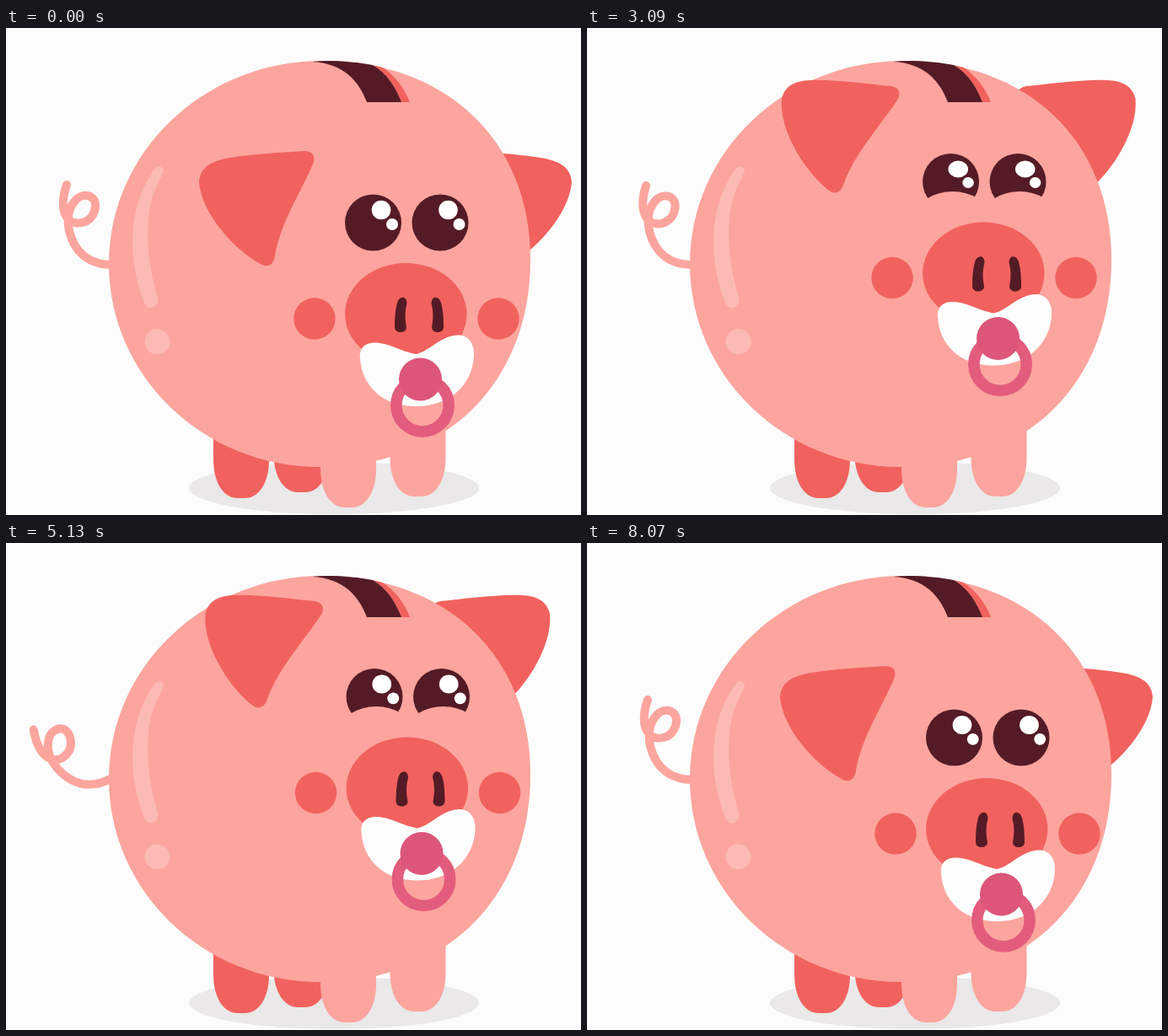
Animation, 682 px wide and 578 px high, one loop 8100 ms. Source, as an HTML page with a canvas:

```html
<!DOCTYPE html>
<html lang="en">
<head>
<meta charset="utf-8">
<title>Piggy bank</title>
<style>
html, body { margin: 0; width: 100%; height: 100%; overflow: hidden; background: #fcfcfc; }
canvas { display: block; width: 682px; height: 578px; }
</style>
</head>
<body>
<canvas id="stage" width="682" height="578"></canvas>
<script>
const ctx = document.getElementById('stage').getContext('2d');
const LOOP = 8100, TAU = Math.PI * 2;
const BG = '#fcfcfc', SKIN = '#fca59e', RED = '#f1625e', DARK = '#541b26',
  SHINE = '#fcbab5', SHADE = '#eae8e8', PINK = '#e25c7e', ROSE = '#dc5679';

const shape = {
  body: 'M122 280C122 147 235 39 375 39C523 39 622 134 622 275C622 421 521 521 372 521C234 521 122 413 122 280Z',
  tail: 'M72 186C66 203 66 219 74 227C83 236 104 232 106 212C107 197 90 195 82 205C74 214 72 226 75 241C81 265 97 281 126 281',
  ear: 'M229 183C230 163 248 157 266 154C297 149 325 148 354 146C363 146 367 151 365 159C350 195 326 230 319 270C317 283 309 285 300 279C270 262 232 220 229 183Z',
  slot: 'M363 40Q372 39 380 39C400 39 420 41 435 44C452 54 462 70 469 88H428C418 62 400 42 363 40Z',
  slotEdge: 'M435 44L447 47C462 57 473 72 479 88H469C462 70 452 54 435 44Z',
  shine: 'M175 169C178 163 186 163 187 169C186 176 172 193 169 225C166 258 171 290 180 320C182 331 169 338 164 326C144 275 144 213 175 169Z',
  nostril: 'M475.5 327C475.5 318 467 317 464 326C461.5 335 461 346 461 355C461 363 475 363 475 355C473 345 473 336 475.5 327Z',
  shield: 'M420 392C418 374 434 371 449 375C463 379 474 385 486 387C500 385 513 368 531 365C546 362 556 372 555 389C553 425 525 449 486 449C446 449 422 424 420 392Z'
};
for (const k in shape) shape[k] = new Path2D(shape[k]);

const clamp = v => Math.min(1, Math.max(0, v));
const ease = (t, a, b) => { const p = clamp((t - a) / (b - a)); return p * p * (3 - 2 * p); };

function fill(path, color) {
  ctx.fillStyle = color;
  ctx.fill(path);
}

function oval(x, y, rx, ry, color) {
  ctx.fillStyle = color;
  ctx.beginPath();
  ctx.ellipse(x, y, rx, ry, 0, 0, TAU);
  ctx.fill();
}

function group(draw) {
  ctx.save();
  draw();
  ctx.restore();
}

function leg(x, bottom, color) {
  const r = x + 66, m = x + 33;
  ctx.fillStyle = color;
  ctx.beginPath();
  ctx.moveTo(x, 465);
  ctx.lineTo(x, bottom - 46);
  ctx.bezierCurveTo(x, bottom - 18, x + 12, bottom, m - 4, bottom);
  ctx.lineTo(m + 4, bottom);
  ctx.bezierCurveTo(r - 12, bottom, r, bottom - 18, r, bottom - 46);
  ctx.lineTo(r, 465);
  ctx.fill();
}

// Head shake phase in turns, linear between [time, turns]
const turns = [[1264, -2.25], [2250, -0.05], [4440, 4.95], [5820, 8.5], [6690, 11], [7018, 11.75]];

function shake(t) {
  if (t <= turns[0][0] || t >= turns[turns.length - 1][0]) return 0;
  const i = turns.findIndex(k => k[0] > t);
  const [t0, p0] = turns[i - 1], [t1, p1] = turns[i];
  return -6.6 * Math.cos(TAU * (p0 + (p1 - p0) * (t - t0) / (t1 - t0)));
}

function tailAngle(t) {
  const start = 932, wag = 437;
  if (t < start || t > start + 15 * wag) return 0;
  return -32 * (1 - Math.cos(TAU * (t - start) / wag)) / 2;
}

function drawTail(t) {
  group(() => {
    ctx.translate(122, 281);
    ctx.rotate(tailAngle(t) * Math.PI / 180);
    ctx.translate(-122, -281);
    ctx.strokeStyle = SKIN;
    ctx.lineWidth = 10;
    ctx.lineCap = 'round';
    ctx.stroke(shape.tail);
  });
}

function drawEar(lift, dx, far) {
  group(() => {
    if (far) {
      ctx.translate(900 - 18.5 * lift, 0);
      ctx.scale(-1, 1);
    }
    ctx.translate(295 + 2.5 * lift + dx, 200 - 88 * lift);
    ctx.rotate(lift * Math.PI / 18);
    ctx.translate(-295, -200);
    fill(shape.ear, RED);
  });
}

function drawEye(x, y, lift, w) {
  oval(x, y, 33.5, 33.5, DARK);
  oval(x + 9.5 - 0.8 * lift, y - 15, 11.3 + 0.7 * w, 11.3 - 1.9 * w, '#fff');
  oval(x + 22.5 - 3 * w, y + 2 - 1.5 * w, 7 - 0.4 * w, 7 - 0.8 * w, '#fff');
  if (lift > 0) oval(x + 2, y + 64 - 24.5 * lift, 42, 28, SKIN);
}

function drawFace(dx, dy, lift, w) {
  group(() => {
    ctx.translate(dx, dy);
    drawEye(435.5, 231, lift, w);
    drawEye(515, 231, lift, w);
    oval(366, 345, 24.7, 24.7, RED);
    oval(584, 345, 24.7, 24.7, RED);
    oval(474.3, 339.5, 72.2, 60.5, RED);
    fill(shape.nostril, DARK);
    group(() => {
      ctx.translate(980, 0);
      ctx.scale(-1, 1);
      fill(shape.nostril, DARK);
    });
    fill(shape.shield, '#fdfdfd');
    ctx.strokeStyle = PINK;
    ctx.lineWidth = 13.5;
    ctx.beginPath();
    ctx.arc(494, 447.7, 31.2, 0, TAU);
    ctx.stroke();
    oval(491.5, 417, 25.5, 25.5, ROSE);
  });
}

function draw(t) {
  const lift = ease(t, 1010, 1340) * (1 - ease(t, 7018, 7420));
  const dip = 3 * ease(t, 900, 1010) * (1 - ease(t, 1010, 1200));
  const dx = shake(t);
  const twinkle = (1 - Math.cos(TAU * t / 300)) / 2;

  ctx.fillStyle = BG;
  ctx.fillRect(0, 0, 682, 578);
  oval(389, 546, 172, 31, SHADE);
  drawTail(t);
  drawEar(lift, dx, true);
  leg(246, 558, RED);
  leg(317.5, 551, RED);
  leg(373, 569, SKIN);
  leg(455.5, 556, SKIN);
  fill(shape.body, SKIN);
  fill(shape.slotEdge, RED);
  fill(shape.slot, DARK);
  fill(shape.shine, SHINE);
  oval(179.5, 372.5, 15, 15, SHINE);
  drawEar(lift, dx, false);
  drawFace(dx + 0.5 * lift, dip - 48.5 * lift, lift, twinkle);
}

let origin = null;
function tick(now) {
  if (origin === null) origin = now;
  draw((now - origin) % LOOP);
  requestAnimationFrame(tick);
}
draw(0);
requestAnimationFrame(tick);
</script>
</body>
</html>
```
